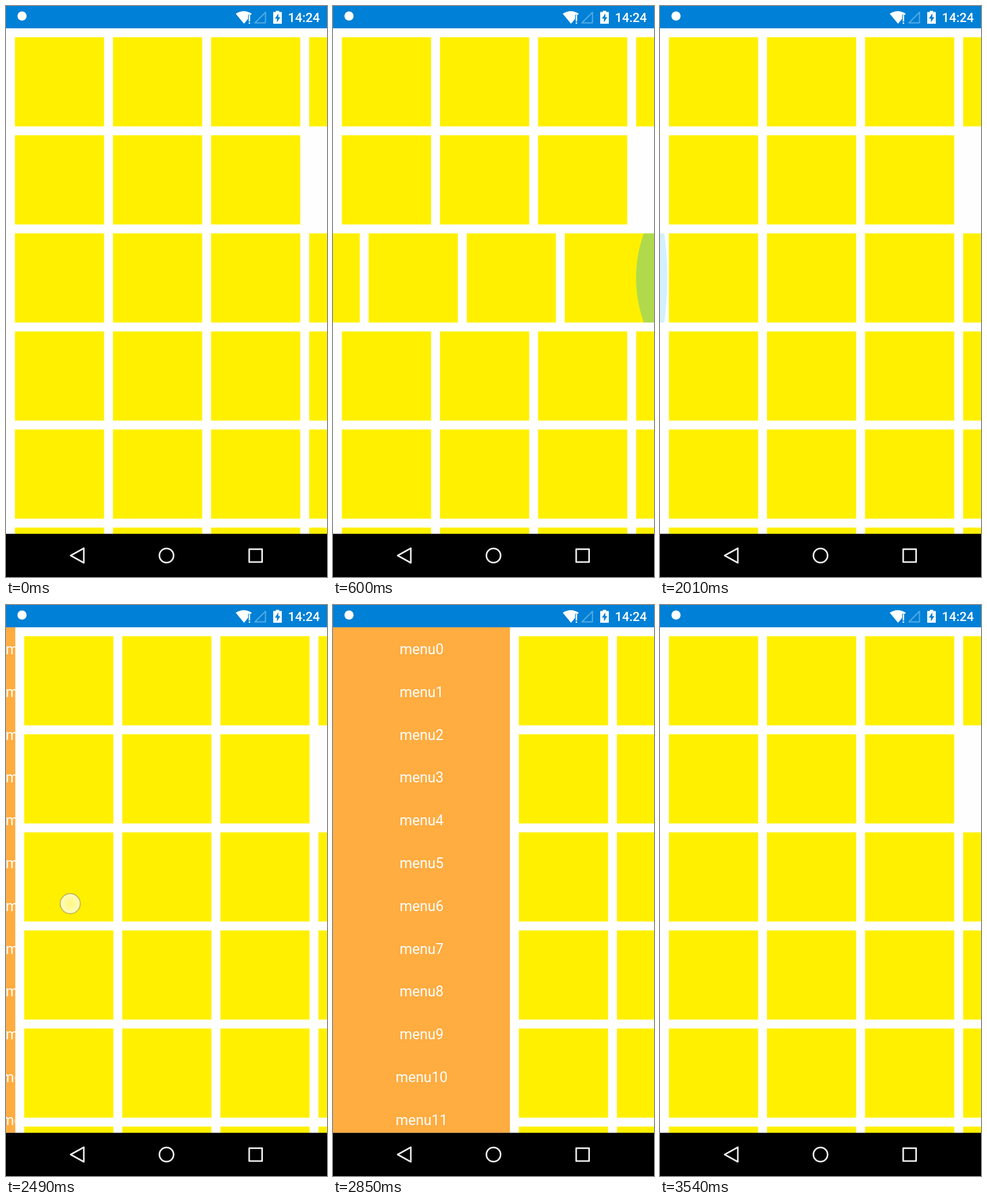
Animation, 561 px wide and 998 px high, one loop 3630 ms. Source, as an HTML page with a canvas:

```html
<!DOCTYPE html>
<html lang="en">
<head>
<meta charset="utf-8">
<style>
  html, body { margin: 0; width: 100%; height: 100%; overflow: hidden; background: #fff; }
  canvas { display: block; }
</style>
</head>
<body>
<canvas id="stage" width="561" height="998"></canvas>
<script>
const ctx = document.getElementById('stage').getContext('2d');
const WIDTH = 561, HEIGHT = 998, LOOP = 3630, STEP = 30;
const DP = WIDTH / 360;
const TOP = 25 * DP, NAV_TOP = 592 * DP;
const GAP = 10 * DP, CELL = 100 * DP, PITCH = GAP + CELL;
const MENU_WIDTH = 200 * DP, MAX_SCROLL = 740 * DP;
const ROW_ITEMS = [10, 3, 10, 10, 10, 10];
const SCROLL_ROW = 2;

const progress = (t, start, end) => Math.min(1, Math.max(0, (t - start) / (end - start)));
const easeIn = (p, power) => p ** power;
const easeOut = (p, power) => 1 - (1 - p) ** power;

function scrollAt(t) {
  if (t < 240) return 270 * easeIn(progress(t, 30, 240), 2);
  if (t < 1110) return 270 + (MAX_SCROLL - 270) * easeOut(progress(t, 240, 490), 1.3);
  if (t <= 1410) return MAX_SCROLL - 268.8 * easeIn(progress(t, 1110, 1410), 3);
  return (MAX_SCROLL - 268.8) * (1 - progress(t, 1410, 1645));
}

const menuDrag = t => 130 * easeIn(Math.max(0, (t - 2340) / 300), 3);

function menuAt(t) {
  if (t < 2650) return menuDrag(t);
  if (t < 3203) {
    const from = menuDrag(2650);
    return from + (MENU_WIDTH - from) * easeOut(progress(t, 2650, 3000), 5);
  }
  return MENU_WIDTH * (1 - easeOut(progress(t, 3203, 3543), 5));
}

const touches = [
  { down: 0, gone: 270, y: 470, x: t => 460 - scrollAt(Math.min(t, 239)) },
  { down: 1050, gone: 1427, y: 470, x: t => 71.2 + MAX_SCROLL - scrollAt(Math.min(t, 1410)) },
  { down: 2250, gone: 2731, y: 522, x: t => 96 + menuDrag(Math.min(t, 2650)) },
  { down: 3120, gone: 3290, y: 488.5, x: () => 499 },
];

function fillRect(color, x, y, w, h) {
  ctx.fillStyle = color;
  ctx.fillRect(x, y, w, h);
}

function text(string, x, y, font, align) {
  ctx.font = font + ' Roboto, sans-serif';
  ctx.textAlign = align;
  ctx.fillStyle = '#fff';
  ctx.fillText(string, x, y);
}

function circle(x, y, r) {
  ctx.beginPath();
  ctx.arc(x, y, r, 0, Math.PI * 2);
}

// Edge glow: grows quickly, then recedes; side is 1 for left, -1 for right.
function drawGlow(t, start, peak, alpha, edge, side) {
  if (t < start || t > peak + 600) return;
  const fade = (1 - progress(t, peak, peak + 600)) ** 2;
  const scale = easeOut(progress(t, start, peak), 2) * fade;
  if (scale <= 0) return;
  const radius = CELL * 1.5, depth = radius * (1 - Math.cos(Math.PI / 6));
  const top = TOP + GAP + SCROLL_ROW * PITCH;
  ctx.save();
  ctx.beginPath();
  ctx.rect(0, top, WIDTH, CELL);
  ctx.clip();
  ctx.globalAlpha = alpha * fade;
  ctx.fillStyle = '#03a9f4';
  ctx.beginPath();
  ctx.ellipse(edge + side * (depth - radius) * scale, top + CELL / 2,
    radius * scale, radius, 0, 0, Math.PI * 2);
  ctx.fill();
  ctx.restore();
}

function drawMenu(open) {
  fillRect('#ffac40', 0, TOP, open, NAV_TOP - TOP);
  const center = MENU_WIDTH / 2 - 0.4 * (MENU_WIDTH - open);
  ctx.save();
  ctx.beginPath();
  ctx.rect(0, TOP, open, NAV_TOP - TOP);
  ctx.clip();
  for (let i = 0; i < 12; i++) {
    text('menu' + i, center, 86 + i * 48 * DP, `${16 * DP}px`, 'center');
  }
  ctx.restore();
}

function drawGrid(t, open) {
  ROW_ITEMS.forEach((count, row) => {
    const scroll = row === SCROLL_ROW ? scrollAt(t) : 0;
    for (let i = 0; i < count; i++) {
      fillRect('#fff000', open + GAP + i * PITCH - scroll, TOP + GAP + row * PITCH, CELL, CELL);
    }
  });
  drawGlow(t, 490, 600, 0.31, WIDTH, -1);
  drawGlow(t, 1645, 1794, 0.41, open, 1);
}

function drawTouch(t, touch) {
  const alpha = progress(t, touch.down, touch.down + 60) * (1 - progress(t, touch.gone - 90, touch.gone));
  if (alpha <= 0) return;
  const x = touch.x(t), y = touch.y;
  const fill = ctx.createRadialGradient(x, y, 0, x, y, 18);
  fill.addColorStop(0, 'rgba(255,255,255,.5)');
  fill.addColorStop(1, 'rgba(255,255,255,.76)');
  ctx.globalAlpha = alpha;
  circle(x, y, 17.5);
  ctx.fillStyle = fill;
  ctx.fill();
  ctx.strokeStyle = 'rgba(140,130,90,.5)';
  ctx.lineWidth = 2;
  ctx.stroke();
  ctx.globalAlpha = 1;
}

const wifi = new Path2D('M401.5 13.5Q415.500 4.500 429.500 13.500L428 15.500H423V22.500L416 31Z');
const signal = new Path2D('M435 29.500L453.500 11V29.500Z');
const battery = new Path2D('M467 10.500H471.500V8.500H477.500V10.500H482V31H467Z');
const bolt = new Path2D('M476 13L470 22H473.500V28.500L479.500 19.500H476Z');
const back = new Path2D('M113 960.500L136 947.800V973.200Z');

function drawStatusBar() {
  const blue = '#0080d6';
  fillRect(blue, 0, 0, WIDTH, TOP);
  ctx.fillStyle = '#fff';
  circle(28, 17.5, 8);
  ctx.fill();
  ctx.fill(wifi);
  ctx.fillRect(424.2, 16, 2.4, 11);
  ctx.fillRect(424.2, 28.6, 2.4, 2.4);
  ctx.fill(battery);
  ctx.fillStyle = blue;
  ctx.fill(bolt);
  ctx.strokeStyle = 'rgba(255,255,255,.35)';
  ctx.lineWidth = 2;
  ctx.stroke(signal);
  text('14:24', 548.5, 28, '500 22px', 'right');
}

function drawNavBar() {
  fillRect('#000', 0, NAV_TOP, WIDTH, HEIGHT - NAV_TOP);
  ctx.strokeStyle = '#eee';
  ctx.lineWidth = 2.8;
  ctx.lineJoin = 'round';
  ctx.stroke(back);
  circle(280.5, 960.5, 12.4);
  ctx.stroke();
  ctx.strokeRect(425, 949.3, 22.6, 22.6);
}

function draw(now) {
  const time = now % LOOP;
  const t = time - time % STEP;
  const open = menuAt(t);
  fillRect('#fefefe', 0, 0, WIDTH, HEIGHT);
  drawGrid(t, open);
  if (open > 0.3) drawMenu(open);
  drawStatusBar();
  drawNavBar();
  touches.forEach(touch => drawTouch(t, touch));
}

const began = performance.now();
function tick() {
  draw(performance.now() - began);
  requestAnimationFrame(tick);
}
tick();
</script>
</body>
</html>
```
